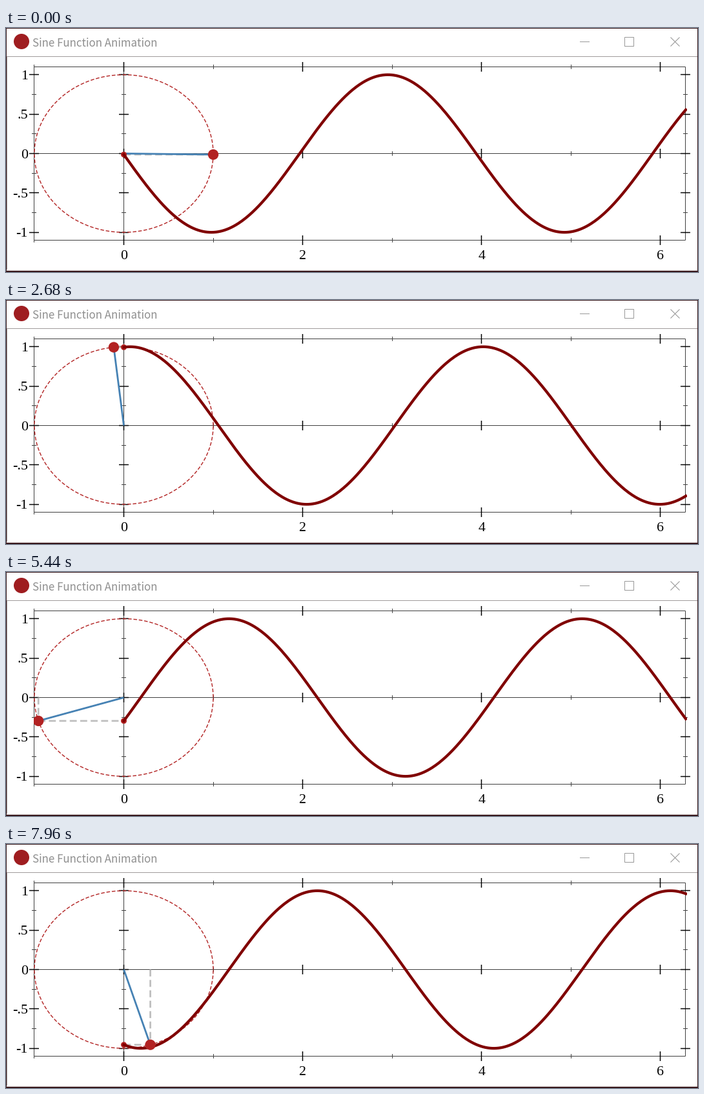
A matplotlib script that plays this animation: 1072x380 px, repeating every 8 s.

```python
import numpy as np
import matplotlib.pyplot as plt
from matplotlib.animation import FuncAnimation
from matplotlib.patches import Circle, Rectangle

W, H, DPI = 1072, 380, 100
PX = 72 / DPI                      # points per pixel
TICK_MS, LOOP_MS = 40, 8000
X0, Y0, UX, UY = 182.5, 195.5, 138.55, 122.7
LEFT, RIGHT, TOP, BOTTOM = 43.5, 1052.5, 60.5, 330.5
WAVE_K = 10 / (2 * np.pi)

# One turn takes 100 redraws, which come at an even pace
REDRAW_MS, LEAD_MS = 99.8, 90
START, TURN_STEP = -0.013, 2 * np.pi / 100


def px(x):
    return X0 + UX * x


def py(y):
    return Y0 - UY * y


def crisp(v):
    return np.floor(v) + 0.5


fig = plt.figure(figsize=(W / DPI, H / DPI), dpi=DPI, facecolor="white")
ax = fig.add_axes([0, 0, 1, 1])
ax.set_xlim(0, W)
ax.set_ylim(H, 0)
ax.axis("off")


def line(xs, ys, color, width, z=1, **kw):
    kw.setdefault("solid_capstyle", "butt")
    return ax.plot(xs, ys, color=color, lw=width * PX, zorder=z,
                   snap=False, **kw)[0]


def label(x, y, text, size=22, family="Liberation Serif", **kw):
    ax.text(x, y, text, fontsize=size * PX, family=family, va="baseline", **kw)


def draw_window():
    edge, gray = "#3a1a1e", "#999999"
    for x in (0.5, W - 0.5):
        line([x, x], [0, H], edge, 1)
    line([0, W], [0.5, 0.5], edge, 1)
    line([0, W], [379, 379], edge, 2)
    line([1, W - 1], [44.5, 44.5], "#a09a9b", 1)
    line([1.5, 1.5], [44, 377], "#a09a9b", 1)
    line([1, W - 1], [376.5, 376.5], "#eee4e4", 1)
    ax.add_patch(Circle((24, 21), 12, color="#9f1d20", lw=0))
    label(40.7, 29, "Sine Function Animation", 16.9, "Noto Sans CJK JP",
          color="#909090")
    line([889, 904], [21.5, 21.5], gray, 1)
    ax.add_patch(Rectangle((958.5, 14.5), 14, 14, fill=False, ec=gray,
                           lw=PX, snap=False))
    line([1029.5, 1043.5], [14.5, 28.5], gray, 1.1)
    line([1029.5, 1043.5], [28.5, 14.5], gray, 1.1)


def tick(x, y, vertical, major):
    half = 7.5 if major else 3.5
    color, width = ("black", 1.5) if major else ("#404040", 1)
    dx, dy = (0, half) if vertical else (half, 0)
    line([x - dx, x + dx], [y - dy, y + dy], color, width, z=2)


def draw_axes():
    for y in (TOP, Y0, BOTTOM):
        line([LEFT, RIGHT], [y, y], "#404040", 1)
        for v in range(-1, 7):
            tick(crisp(px(v)), y, True, v % 2 == 0)
    for x in (LEFT, X0, RIGHT):
        line([x, x], [TOP, BOTTOM], "#404040", 1)
        for q in range(-4, 5):
            tick(x, crisp(py(q / 4)), False, q % 2 == 0)
    for v in range(0, 7, 2):
        label(px(v), 360.5, str(v), ha="center")
    for v in np.arange(-1, 1.1, 0.5):
        label(33.7, py(v) + 7.2, f"{v:g}".replace("0.", "."), ha="right")
    a = np.linspace(0, 2 * np.pi, 400)
    line(px(np.cos(a)), py(np.sin(a)), "#b22222", 1.4, z=3, **dashes)


dashes = dict(linestyle=(0, (4, 2)), dash_capstyle="butt")
draw_window()
draw_axes()

drop = line([], [], "#bebebe", 2.7, z=4, **dashes)
reach = line([], [], "#bebebe", 2.7, z=4, **dashes)
radius = line([], [], "#4682b4", 2.8, z=5)
shadow = Circle((X0, Y0), 4.5, fc="#b22222", lw=0, zorder=6)
wave = line([], [], "#800000", 4.3, z=7, solid_capstyle="projecting")
dot = Circle((X0, Y0), 8.2, fc="#b22222", lw=0, zorder=8)
ax.add_patch(shadow)
ax.add_patch(dot)

moving = (drop, reach, radius, shadow, wave, dot)
plot_area = Rectangle((43, 60), 1012, 271, transform=ax.transData)
for artist in moving:
    artist.set_clip_path(plot_area)

wave_x = np.linspace(0, 2 * np.pi, 500)


def update(frame):
    redraw = int((frame * TICK_MS + LEAD_MS) / REDRAW_MS)
    angle = START + redraw * TURN_STEP
    x, y = px(np.cos(angle)), py(np.sin(angle))
    drop.set_data([x, x], [min(Y0 - 4.5, y) if y < Y0 else Y0, y])
    reach.set_data([min(x, X0), max(x, X0)], [y, y])
    radius.set_data([X0, x], [Y0, y])
    wave.set_data(px(wave_x), py(np.sin(angle - WAVE_K * wave_x)))
    shadow.center = (X0, y)
    dot.center = (x, y)
    return moving


anim = FuncAnimation(fig, update, frames=LOOP_MS // TICK_MS,
                     init_func=lambda: update(0), interval=TICK_MS,
                     repeat=True, repeat_delay=0)
plt.show()
```
